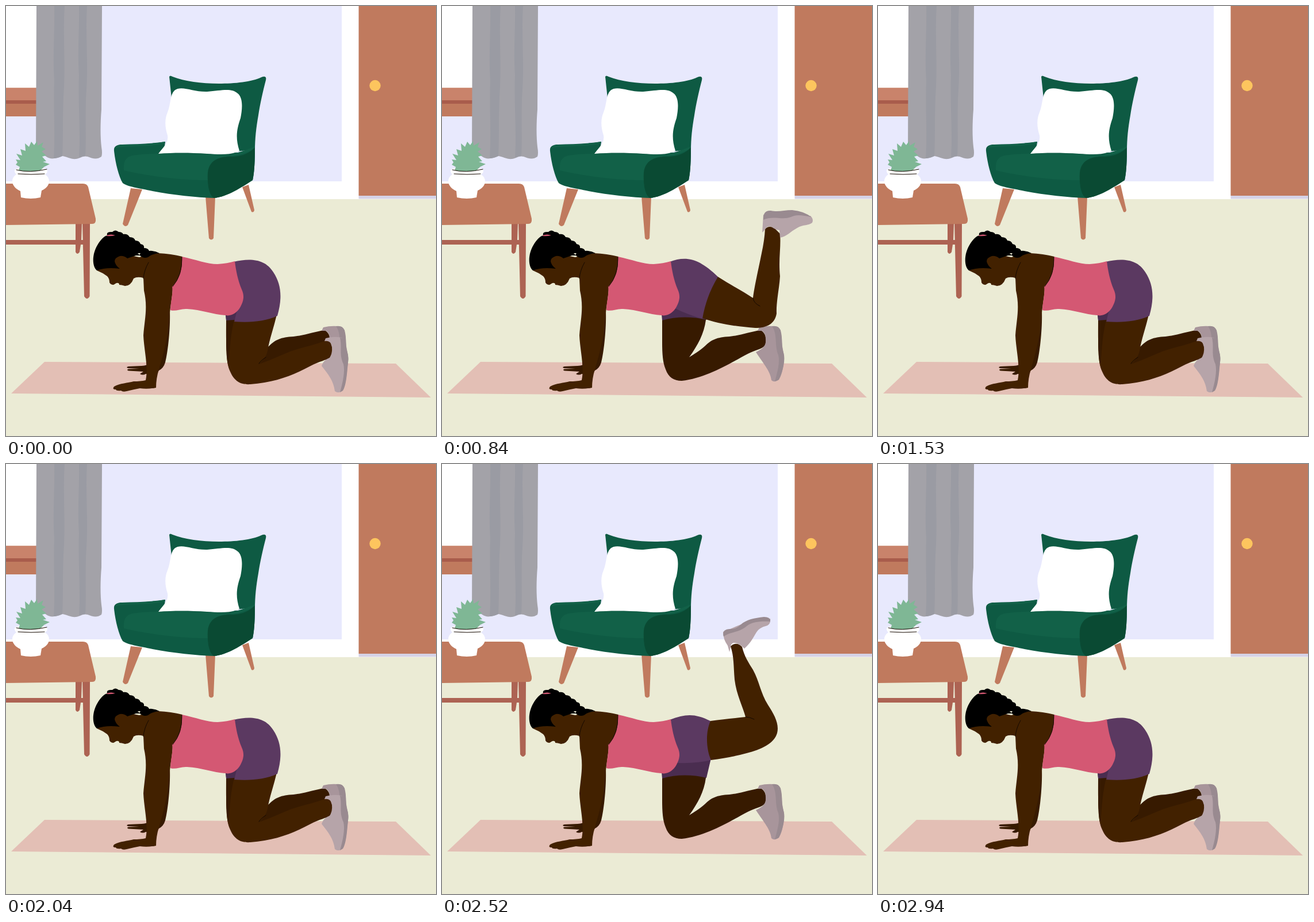
Recreate the animation shown at these times as an HTML page. Size 748 px wide and 748 px high, loop 2970 ms.

```html
<!DOCTYPE html>
<html lang="en">
<head>
<meta charset="utf-8">
<title>Kneeling kickback</title>
<style>
html, body { margin: 0; height: 100%; overflow: hidden; }
svg { display: block; width: 100%; height: 100%; }
.wood { fill: #c07a5e; }
.leg { fill: #ad6353; }
.skin { fill: #422100; }
.shade { fill: #371a00; }
.shorts { fill: #5b3961; }
.under { fill: #4a2d50; }
.shoe { fill: #b6a4a9; }
.sole { fill: #998a90; }
.fold { fill: #9a9ba3; }
.line { fill: none; stroke: #150900; stroke-linecap: round; }
</style>
</head>
<body>
<svg viewBox="0 0 748 748">
  <!-- room -->
  <rect width="748" height="748" fill="#fff"/>
  <rect width="584" height="305" fill="#e8e9fd"/>
  <rect y="336" width="748" height="412" fill="#ebebd5"/>
  <rect width="53" height="143" fill="#fff"/>
  <rect class="wood" y="142.500" width="53" height="49.500"/>
  <rect y="142.500" width="53" height="22" fill="#c9836b"/>
  <rect y="164" width="53" height="6" fill="#a95c4c"/>
  <rect class="wood" x="613.500" width="134.500" height="330"/>
  <rect x="613.500" y="330" width="134.500" height="5.500" fill="#d5d2e6"/>
  <circle cx="642" cy="138.500" r="9.700" fill="#fdc55e"/>

  <!-- curtain -->
  <path fill="#a3a2a8" d="M53 0H167L166 180C164 205 164 228 166 245Q168 257 166 262C158 268 150 265 142 262C134 260 131 264 122 266C113 267 106 262 98 261C88 265 78 268 70 262C62 256 57 259 52 262Z"/>
  <path class="fold" d="M84 0H102C99 45 103 90 101 140C98 185 100 220 98 261Q90 265 83 265C86 220 82 175 84 130C81 85 85 45 84 0ZM127 0H141C138 50 143 95 140 145C137 190 140 225 138 261Q132 261 127 264C130 215 125 170 127 120C124 75 128 40 127 0Z"/>

  <!-- armchair -->
  <path class="wood" d="M217 317L237 319 212 381Q207 386 203 379ZM347 331H364L361 404Q357 409 353 404ZM411 315L422 311 432 355Q431 360 427 358Z"/>
  <path fill="#0e5a43" d="M284 123Q285 120 290 123C310 131 340 135 370 135C398 135 428 132 444 124Q454 120 452 129C447 148 442 170 439 190C435 212 433 232 433 250L300 262C294 220 288 160 284 123Z"/>
  <path fill="#0e5a43" d="M188 252C187 244 193 241 202 241C225 240 250 240 277 236L275 252 405 255Q420 250 433 245C433 270 432 290 429 303C410 315 385 332 362 334C330 333 292 329 255 322C232 317 210 314 203 308C196 296 190 272 188 252Z"/>
  <path fill="#126148" d="M205 286C204 272 207 263 220 260C265 254 335 257 393 260C365 264 353 273 351 303C300 303 250 296 205 286Z"/>
  <path fill="#126148" d="M190 247Q193 241 204 241C230 241 255 240 277 236L276 239C250 246 215 242 190 247ZM396 257Q416 252 433 244L432 248Q410 261 390 261Z"/>
  <path fill="#0a4a33" d="M433 246C433 270 432 290 429 303C410 315 385 332 362 334C352 329 350 305 351 290C353 270 368 262 390 262C410 262 422 257 433 246Z"/>
  <path fill="#fff" d="M265 257C275 244 283 238 281 225C276 210 276 196 281 185C287 170 285 155 293 147C305 137 325 150 350 149C375 147 392 142 403 152C413 160 411 180 408 195C401 215 399 230 406 252C390 260 370 258 350 257C320 255 290 255 265 257Z"/>

  <!-- table and plant -->
  <path class="leg" d="M0 407H121V379H132L131 407H135V415H130L128 428Q124 434 121 428V415H0ZM133 377H146L145.500 505Q141 513 136 505Z"/>
  <path class="wood" d="M0 309H134Q141 309 143 315L156 370Q157 379 150 379L0 381Z"/>
  <path fill="#fff" d="M16 284Q42 278 71 284Q74 289 68 293C79 300 77 315 62 321L60 333Q43 337 26 333L25 322C10 315 6 301 18 293Q13 288 16 284Z"/>
  <path fill="#7fb795" d="M22 286L24 280 17 276 20 272 17 267 25 268 18 257 28 260 25 249 34 252 33 239 40 245 44 236 49 242 54 235 55 243 65 237 62 245 69 249 62 253 70 260 63 262 70 270 64 271 76 275 66 280 60 286Q43 290 22 286Z"/>
  <path class="line" d="M18 285Q40 291 71 284M21 292Q44 294 67 292"/>

  <path fill="#e3bfb5" d="M67 619L678 622 739 681 9 674Z"/>

  <!-- far arm and supporting leg -->
  <path class="shade" d="M262 530H285C286 560 282 600 277 620Q274 630 266 634L262 640H243Q238 643 233 640L239 636 213 634.500Q209 633 213 631.500L232 631 212 630Q208 628 213 627L236 626Q246 625 250 622Z"/>
  <path class="shade" d="M383 530V585C383 605 384 620 389 632C394 646 403 652 417 652C460 647 500 622 532 605C545 598 558 597 562 590C566 580 563 568 554 564C538 566 520 573 500 575C478 576 468 581 458 591C448 600 438 606 430 611C445 590 456 570 459 546V530Z"/>
  <path class="shoe" style="fill:#a8959b" d="M549 565L552 559Q568 555 584 558Q590 563 591 580C591 595 596 605 595 616C593 635 590 643 586 650Q579 656 573 651C571 635 561 625 546 602Q562 595 563 585Q564 568 556 565Z"/>
  <path class="sole" d="M574 557Q585 555 589 564C593 580 590 592 594 603C598 615 593 635 586 650L579 653C584 635 588 620 585 607C578 590 584 570 574 557Z"/>
  <path class="under" d="M382 536L411 515 468 512 460 546C435 540 407 540 383 547Z"/>

  <g class="pose">
    <path class="skin" d="M397 540C383 580 380 615 390 636C398 655 411 659 425 658C470 655 502 641 530 626C545 618 558 616 564 611Q570 598 565 586Q561 581 554 583C530 592 505 595 480 607Q460 616 440 623Q452 614 455 600C458 580 466 560 472 532Z"/>
    <path class="shade" d="M383 545L398 543C390 570 390 595 387 622C382 600 383 570 383 545Z"/>
    <path class="line" d="M440 622Q443 617 452 611"/>
    <path class="under" d="M382 536L405 525 398 546 383 547Z"/>
    <path class="shorts" d="M396 445C425 438 451 440 465 463C479 484 481 508 472 539C450 549 425 551 397 549L403 525Z"/>
    <path class="shoe" d="M556 578Q570 574 584 577Q590 583 590 594C592 602 596 608 595 617C593 640 591 660 586 669Q579 675 572 670C570 652 560 640 549 626Q552 616 563 612Q571 600 565 587Q562 582 554 583Z"/>
    <path class="sole" d="M581 577Q590 577 590 590C592 602 597 607 595 620C593 640 592 660 586 669L581 672C586 655 590 635 587 623C579 605 585 595 581 577Z"/>
  </g>

  <g class="pose">
    <path class="skin" d="M440 470L480 471C505 487 525 497 541 508C543 490 550 460 556 430Q561 407 562 388Q568 381 578 386L588 396C590 420 585 440 588 470C587 490 581 515 582 535C579 553 565 560 545 560C515 558 480 553 453 543L430 520Z"/>
    <path class="line" d="M541 508Q542 517 553 522"/>
    <path class="shorts" d="M396 445C425 434 447 439 480 471C467 493 458 515 453 544Q430 538 403 525Z"/>
    <path class="shoe" d="M557 394L559 363Q585 360 641 365Q647 371 644 377C638 382 628 380 618 386C605 393 600 401 588 403L587 390Q579 389 573 384Q565 382 562 389Z"/>
    <path class="sole" d="M559 372Q558 355 572 356C585 359 595 355 609 355Q630 357 642 367C628 364 616 362 607 367C592 373 575 364 559 372Z"/>
  </g>

  <g class="pose">
    <path class="skin" d="M440 460L467 447C490 444 510 442 528 440C524 424 512 401 509 375C507 350 508 335 502 317Q512 308 522 318C526 335 533 345 541 358C552 378 554 398 567 419C578 436 587 452 583 468C578 486 555 497 530 503Q505 510 468 515L440 505Z"/>
    <path class="line" d="M528 440Q535 440 543 444"/>
    <path class="shorts" d="M396 445C425 434 440 434 467 447C457 470 461 500 468 515Q445 521 409 520Z"/>
    <path class="shoe" d="M500 327L497 316Q489 305 489 292L525 277 571 269Q572 278 566 281C555 284 550 287 545 296C540 305 535 313 526 321Q516 311 507 311Q502 313 502 319Z"/>
    <path class="sole" d="M490 300Q486 288 500 287Q511 288 519 280C530 270 543 268 560 266Q572 266 571 274C555 273 540 274 530 282C516 294 502 291 490 300Z"/>
  </g>

  <!-- torso, near arm, head -->
  <path class="skin" d="M158 460L166 444 196 430 232 437Q250 431 265 430Q287 431 307 436C309 460 303 474 290 489C290 505 285 525 284 545C282 575 274 605 266 632Q261 648 261 664Q246 667 233 665Q222 667 210 670Q203 672 200 669Q192 670 191 667Q184 667 188 662C198 656 212 656 222 653Q234 653 243 651C248 628 240 598 239 573C241 545 247 525 240 495L239 473Q228 470 222 474Q217 487 207 487Q201 485 197 485Q197 481 192 482L187 485Q182 485 180 481Q180 474 176 470Q168 464 158 460Z"/>
  <path fill="#d45873" d="M306 436C330 441 350 449 368 449Q385 448 398 444C400 460 403 476 410 493C416 506 412 515 408 523C402 534 392 540 382 538C360 537 340 528 315 527C304 526 295 532 286 529C286 515 291 500 289 488C302 474 307 460 306 436Z"/>
  <path class="line" d="M306 437Q307 468 290 488M248 446Q240 460 239 474"/>
  <path d="M158 460C149 452 150 431 159 416C164 407 171 400 176 399Q174 392 185 393Q190 388 196 393Q202 393 204 397Q212 396 215 402Q223 402 225 408Q232 408 234 414Q241 415 240 421Q247 421 249 426Q258 425 267 430Q254 431 247 437Q239 440 233 434L226 434 211 439Q205 434 198 435Q189 438 189 444Q190 451 198 457Q174 454 158 460Z"/>
  <path fill="#d45873" d="M175 399Q183 396 190 399Q182 401 175 400Z"/>
  <path fill="#ebebd5" d="M229 430L234 430 232 433Z"/>
</svg>
<script>
const poses = [...document.querySelectorAll('.pose')];
const REP = 1485, STEP = REP / 6, START = REP * 5 / 12;
const order = [1, 2, 1]; // half raised, fully raised, half raised

function draw(now) {
  const step = Math.floor((now % REP - START) / STEP);
  const active = order[step] ?? 0;
  poses.forEach((pose, i) => pose.style.display = i === active ? '' : 'none');
}

const start = performance.now();
function tick() {
  draw(performance.now() - start);
  requestAnimationFrame(tick);
}
tick();
</script>
</body>
</html>
```
